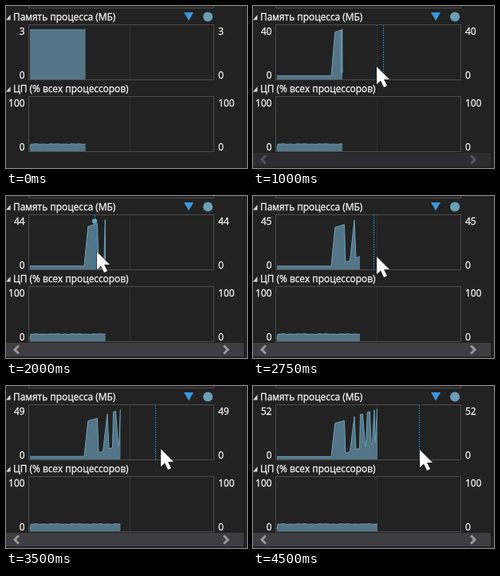
An HTML page with a canvas for the animation above (4.75 s loop, 302x203 px).

```html
<!DOCTYPE html>
<html lang="ru">
<head>
<meta charset="utf-8">
<style>
  html, body { margin: 0; width: 100%; height: 100%; overflow: hidden; background: #222; }
  canvas { display: block; }
</style>
</head>
<body>
<canvas id="stage" width="302" height="203"></canvas>
<script>
const ctx = document.getElementById('stage').getContext('2d');
const STEP = 250, STEPS = 19;
const LEFT = 29, RIGHT = 260, HEIGHT = 68;
const FILL = '#547586', EDGE = '#6a9fb7', TEXT = '#f5f5f5', FRAME = '#4d4d4d';

// Allocation spikes: x of rise, top, end of plateau, collected
const spikes = [
  [98, 102.8, 114.5, 116], [121.5, 127, 127, 129], [133.5, 134.5, 137.5, 140.5],
  [141.5, 143.3, 146.4, 148], [149.5, 152, 152, 153.2], [153.2, 155.5, 157, 158]
];
const burstSteps = [1, 4, 8];   // a short burst is the newest sample
const low = x => Math.max(2.74, 6 + .27 * (x - 116));
const peak = x => 34.75 + .255 * (x - 102.4);

// Pointer path: [step, x]
const pointerPath = [[3, 171], [4, 155], [7, 108], [8, 114], [10, 147], [11, 155], [14, 194], [16, 207], [18, 209]];

// Cuts a polyline at x, interpolating its last point
function trim(points, x) {
  const i = points.findIndex(p => p[0] >= x);
  if (i < 1) return points;
  const [x1, y1] = points[i - 1], [x2, y2] = points[i];
  return [...points.slice(0, i), [x, y1 + (y2 - y1) * (x - x1) / (x2 - x1)]];
}
const valueAt = (points, x) => trim(points, x).at(-1)[1];

function memoryCurve(step, edge) {
  const points = [[LEFT + 1, low(LEFT)]];
  for (const [rise, top, end, done] of spikes) {
    if (top > edge) break;
    points.push([rise, low(rise)], [top, peak(top)], [end, peak(top) + .2 * (end - top)], [done, low(done)]);
  }
  if (points.at(-1)[0] < edge) points.push([edge, low(edge)]);
  if (!burstSteps.includes(step)) return trim(points, edge);
  const start = edge - 1.7, tip = edge - .4;
  return [...trim(points, start), [start, low(start)], [tip, peak(tip)], [edge, low(edge)]];
}

function cpuCurve(edge) {
  const points = [[LEFT + 1, 3], [LEFT + 2, 13]];
  for (let x = 34; x < edge + 3; x += 3)
    points.push([x, 13.2 + .35 * Math.sin(x * .7) + .25 * Math.sin(x * .23)]);
  return trim(points, edge);
}

function shape(points, fill, stroke, close = true) {
  ctx.beginPath();
  points.forEach(([x, y]) => ctx.lineTo(x, y));
  if (close) ctx.closePath();
  if (stroke) { ctx.strokeStyle = stroke; ctx.stroke(); }
  if (fill) { ctx.fillStyle = fill; ctx.fill(); }
}

const line = (x1, y1, x2, y2, color) => shape([[x1, y1], [x2, y2]], null, color, false);

function dot(x, y, r) {
  ctx.beginPath();
  ctx.arc(x, y, r, 0, 7);
  ctx.fillStyle = EDGE;
  ctx.fill();
}

function label(text, x, y, align = 'left') {
  ctx.font = '11.9px "Open Sans", "Noto Sans", sans-serif';
  ctx.textAlign = align;
  ctx.fillStyle = ctx.strokeStyle = TEXT;
  ctx.lineWidth = .3;
  ctx.fillText(text, x, y);
  ctx.strokeText(text, x, y);
  ctx.lineWidth = 1;
}

function chart(title, top, max, points) {
  const bottom = top + HEIGHT;
  shape([[0, top - 6.5], [5.5, top - 13], [5.5, top - 6.5]], '#d8d8d8');
  label(title, 9, top - 6);
  line(155.5, top, 155.5, bottom, '#303030');

  const curve = points.map(([x, v]) => [x, bottom - v / max * HEIGHT]);
  shape([[LEFT + 1, bottom], ...curve, [curve.at(-1)[0], bottom]], FILL);
  shape(curve, null, EDGE, false);

  ctx.strokeStyle = FRAME;
  ctx.strokeRect(LEFT - .5, top - .5, RIGHT - LEFT + 1, HEIGHT + 1);
  [[max, top + 12], [0, bottom - 1]].forEach(([value, y]) => {
    label(value, 23.5, y, 'right');
    label(value, 266, y);
  });
}

function scrollbar(active) {
  ctx.fillStyle = active ? '#3e3e42' : '#2d2d30';
  ctx.fillRect(0, 184, 298, 17);
  ctx.lineWidth = 3;
  [[11, 1], [278, -1]].forEach(([x, d]) =>
    shape([[x + 5 * d, 187.5], [x, 192.5], [x + 5 * d, 197.5]], null, active ? '#999' : '#555558', false));
  ctx.lineWidth = 1;
}

function hoverLine(x, memory, max) {
  ctx.setLineDash([2, 1]);
  line(x + .5, 24, x + .5, 92, '#1c7fc9');
  ctx.setLineDash([]);
  if (x < memory.at(-1)[0]) dot(x, 88 - valueAt(memory, x) / max * HEIGHT, 3.2);
}

function arrow(x) {
  const y = 70 + Math.sqrt(Math.max(0, x - 114));
  const outline = [[0, 0], [0, 22], [5, 17.5], [9, 26], [13, 24], [9, 16], [16, 16]];
  shape(outline.map(([dx, dy]) => [x + dx, Math.round(y) + dy]), '#fff', '#111');
}

function draw(step) {
  const edge = 99.6 + 3.13 * step;
  const memory = memoryCurve(step, edge);
  const max = Math.round(1.085 * Math.max(...memory.map(p => p[1])));

  ctx.fillStyle = '#222';
  ctx.fillRect(0, 0, 302, 203);
  shape([[28.5, 0], [28.5, 2.5], [260.5, 2.5], [260.5, 0]], null, FRAME, false);
  line(298.5, 0, 298.5, 203, '#191919');

  chart('Память процесса (МБ)', 24, max, memory);
  chart('ЦП (% всех процессоров)', 114, 100, cpuCurve(edge));
  shape([[223, 8], [235, 8], [229, 18.5]], '#3a96dd');
  dot(253, 13.5, 6);

  if (step < 4) return;
  scrollbar(step > 4);
  hoverLine(Math.floor(valueAt(pointerPath, step - .5)), memory, max);
  arrow(Math.round(valueAt(pointerPath, step)));
}

function tick() {
  draw(Math.floor(performance.now() / STEP) % STEPS);
  requestAnimationFrame(tick);
}
tick();
</script>
</body>
</html>
```
